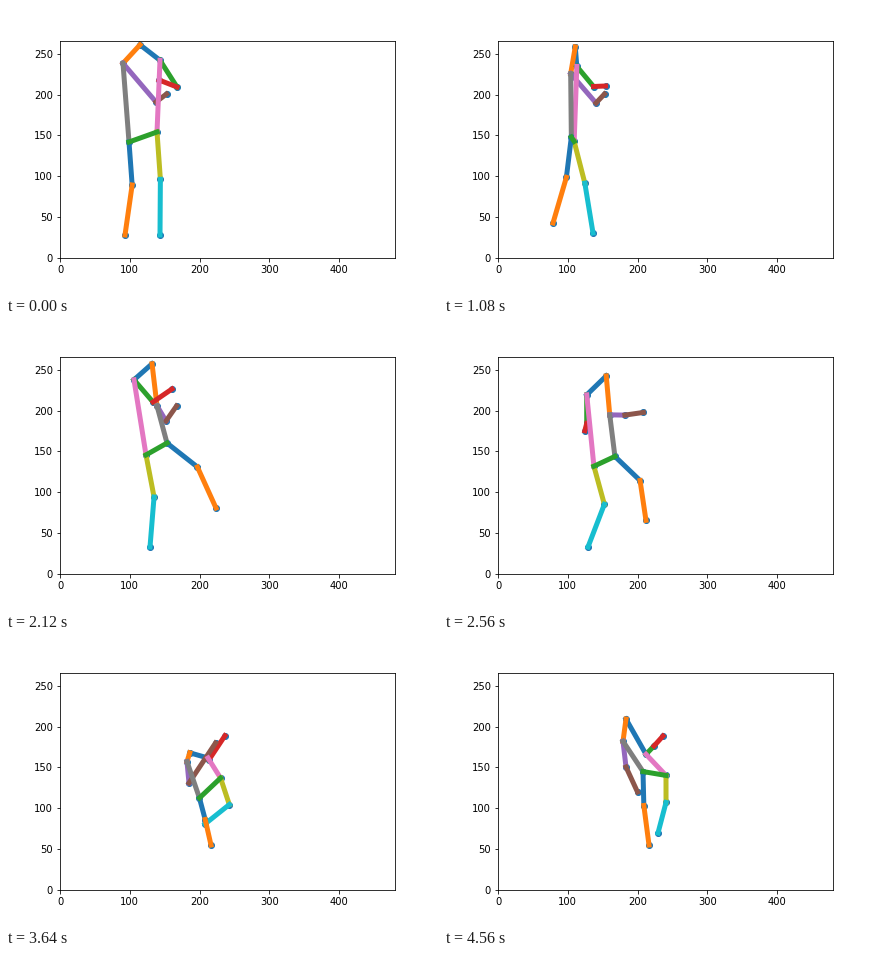
A matplotlib script for the animation above (4.6 s loop, 432 px wide and 288 px high).

```python
import numpy as np
import matplotlib.pyplot as plt
from matplotlib.animation import FuncAnimation

W, H = 432, 288
FRAMES, STEP = 115, 40
SPAN_X, SPAN_Y = 480, 266
LEFT, BASE = 0.125 * W, 0.875 * H
SCALE_X = 0.775 * W / SPAN_X
SCALE_Y = 0.755 * H / SPAN_Y

# Phases of the pitch, in frames.
PHASES = {"ready": (0, 15), "turn": (15, 39), "lift": (39, 53),
          "stride": (53, 74), "throw": (74, 91), "rise": (91, 114)}

BONES = [
    ("head", "r_shoulder"), ("head", "l_shoulder"),
    ("r_shoulder", "r_elbow"), ("r_elbow", "r_wrist"),
    ("l_shoulder", "l_elbow"), ("l_elbow", "l_wrist"),
    ("r_shoulder", "r_hip"), ("l_shoulder", "l_hip"),
    ("r_hip", "r_knee"), ("r_knee", "r_ankle"),
    ("l_hip", "l_knee"), ("l_knee", "l_ankle"),
    ("l_hip", "r_hip"),
]


def ease(t, start, end):
    u = np.clip((t - start) / (end - start), 0, 1)
    return u * u * (3 - 2 * u)


def bell(t, centre, width):
    return np.exp(-((t - centre) / width) ** 2)


def travel(t, start, **shifts):
    """Start point plus one eased shift per named phase."""
    place = np.array(start, float)
    for phase, shift in shifts.items():
        place += np.array(shift) * ease(t, *PHASES[phase])
    return place


def knee(hip, ankle, bend):
    """Point just above mid-leg, pushed forward by bend."""
    leg = ankle - hip
    forward = np.array([leg[1], -leg[0]]) / np.hypot(*leg)
    return hip + 0.46 * leg + bend * forward


def pose(t):
    """Joint places in stage pixels."""
    away, back = ease(t, 0, 53), ease(t, 70, 94)
    whip = bell(t, 82, 4)

    chest = travel(t, (135.5, 55.8), ready=(-6, 6), turn=(0.5, 4.5), lift=(9.5, 4.5),
                   stride=(27.5, 22.5), throw=(24.5, 28.5), rise=(-1, -12))
    pelvis = travel(t, (137, 131), ready=(-11.5, 0.5), turn=(6.5, 3.5), lift=(18.5, -8),
                    stride=(18.5, 23), throw=(35, 0), rise=(6.5, -14.5))

    # Turning away and back swaps the two sides of the trunk.
    shoulder = np.array([18.5 - 30 * away + 23 * back,
                         -1.5 - 11.5 * bell(t, 53, 20) + 8 * ease(t, 91, 114)])
    hip = np.array([14 - 24.5 * away + 22 * back,
                    -5 + 7 * ease(t, 0, 15) + 4 * bell(t, 55, 16) - 12 * bell(t, 91, 10)])
    nod = np.array([-1.5 + 10 * ease(t, 0, 74) - 17 * back,
                    -17 - 12 * away + 22 * bell(t, 91, 11)])

    r_ankle = travel(t, (154, 229), turn=(-10, -4), throw=(55, -39), rise=(15, 9))
    l_ankle = travel(t, (119, 229), ready=(-13, -10), turn=(6, -4), lift=(98, -29),
                     stride=(-15, 23), throw=(10, -2))
    r_bend = 2 + 19 * bell(t, 80, 22)
    l_bend = 5 - 7 * t / FRAMES + 11 * bell(t, 63, 18)

    return {
        "head": chest + nod,
        "r_shoulder": chest + shoulder,
        "l_shoulder": chest - shoulder,
        "r_hip": pelvis + hip,
        "l_hip": pelvis - hip,
        "r_knee": knee(pelvis + hip, r_ankle, r_bend),
        "l_knee": knee(pelvis - hip, l_ankle, l_bend),
        "r_ankle": r_ankle,
        "l_ankle": l_ankle,
        "r_elbow": travel(t, (171, 81), ready=(-19, -7), turn=(-5, 13), lift=(0, -7),
                          stride=(-8, 40), throw=(64, 2), rise=(7, -14)) - (8 * whip, 25 * whip),
        "r_wrist": travel(t, (153, 74), ready=(8, 13), turn=(1, -14), lift=(4, -6),
                          stride=(-47, 78), throw=(100, -47)) - (14 * whip, 45 * whip),
        "l_elbow": travel(t, (150, 96), turn=(4, 2), lift=(6, 1),
                          stride=(39, -11), throw=(-16, 57), rise=(-1, -16)),
        "l_wrist": travel(t, (160.5, 88), lift=(10, -4),
                          stride=(54, 12), throw=(-15, 9), rise=(-16, 49)),
    }


def to_axes(place):
    return (place[0] - LEFT) / SCALE_X, (BASE - place[1]) / SCALE_Y


plt.rcParams["font.family"] = "DejaVu Sans"
fig = plt.figure(figsize=(W / 72, H / 72), dpi=72, facecolor="white")
ax = fig.add_axes([0.125, 0.125, 0.775, 0.755])
ax.set_xlim(0, SPAN_X)
ax.set_ylim(0, SPAN_Y)

dots = ax.scatter([], [], color="C0")
lines = [ax.plot([], [], color=f"C{i % 10}", lw=5)[0] for i in range(len(BONES))]


def draw(frame):
    joints = {name: to_axes(place) for name, place in pose(frame).items()}
    dots.set_offsets(list(joints.values()))
    for line, (a, b) in zip(lines, BONES):
        line.set_data(*zip(joints[a], joints[b]))
    return [dots, *lines]


anim = FuncAnimation(fig, draw, frames=FRAMES, interval=STEP,
                     repeat=True, repeat_delay=0, blit=False)
plt.show()
```
